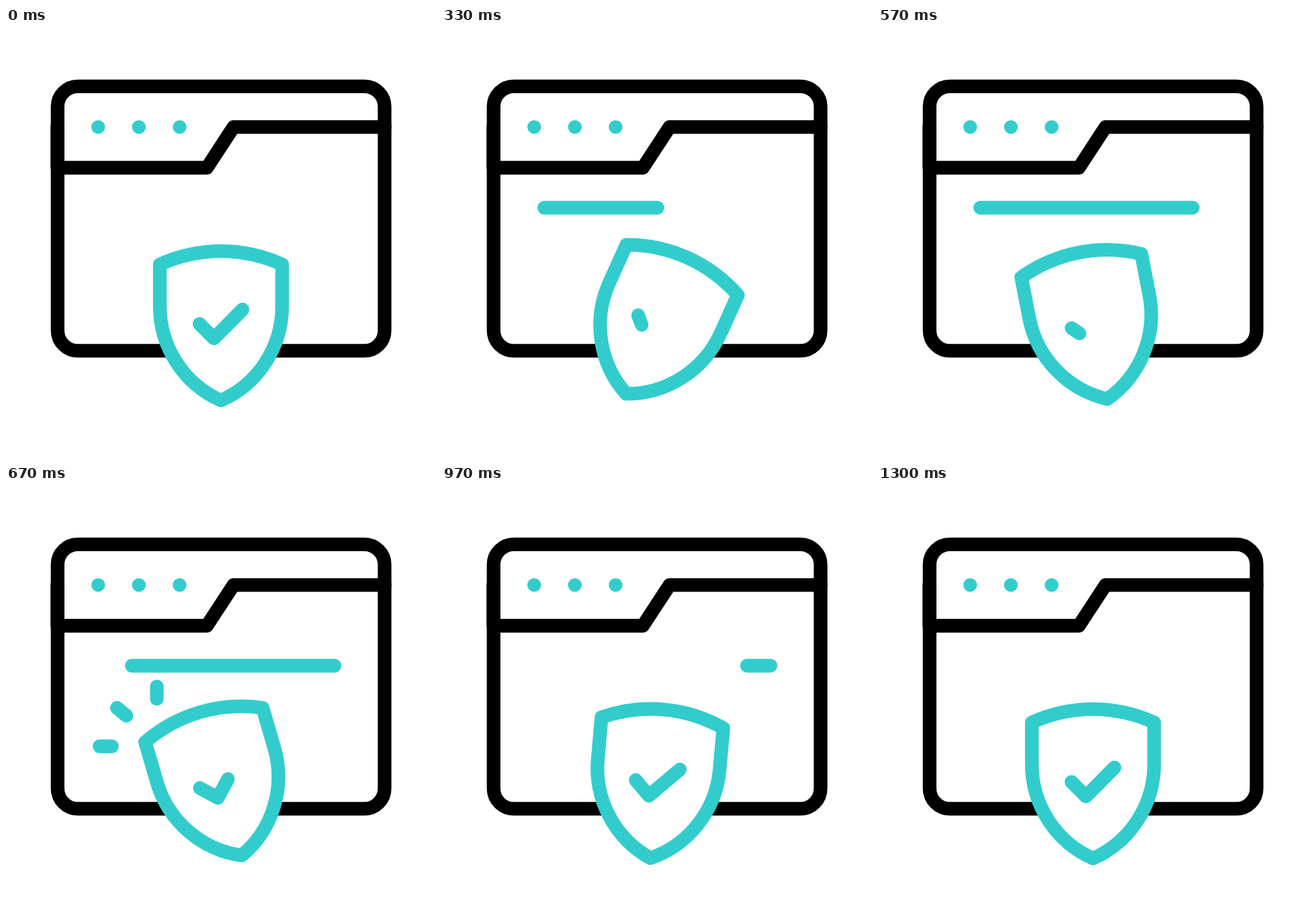
These frames come from a looping animation (640x640 px, 1.67 s). An HTML page with a canvas:

```html
<!DOCTYPE html>
<html lang="en">
<head>
<meta charset="utf-8">
<title>Protected folder</title>
<style>
  html, body { margin: 0; width: 100%; height: 100%; overflow: hidden; background: #fff; }
  canvas { display: block; width: 100vw; height: 100vh; }
</style>
</head>
<body>
<canvas id="stage" width="640" height="640"></canvas>
<script>
const ctx = document.getElementById('stage').getContext('2d');
const LOOP = 1670;
const TEAL = '#33cccc';
const PIVOT = [320, 443];

// Shield sway: [step, degrees]
const SWAY = [[1, 0], [11, 25], [19, -17.7], [26.2, 10], [33.4, -4.7], [39, 0]];

const CHECK = [[288, 440.5], [309.5, 462], [352, 419]];
const LINE = [[152.2, 267.5], [489, 267.5]];
const RAYS = [
  [[159.4, 387.5], [119, 387.5]],
  [[180.5, 343], [149.7, 317.3]],
  [[224.5, 318.6], [224.5, 278.2]]
];

function ease(step, from, to) {
  const x = Math.min(1, Math.max(0, (step - from) / (to - from)));
  return x * x * (3 - 2 * x);
}

function swayAngle(step) {
  let angle = 0;
  for (let i = 1; i < SWAY.length; i++) {
    const [a, va] = SWAY[i - 1], [b, vb] = SWAY[i];
    angle += (vb - va) * ease(step, a, b);
  }
  return angle * Math.PI / 180;
}

function strokePath(points) {
  ctx.beginPath();
  points.forEach(([x, y]) => ctx.lineTo(x, y));
  ctx.stroke();
}

// Strokes the part of a polyline between two fractions of its length.
function strokePart(points, from, to) {
  if (to - from < 0.001) return;
  const lengths = points.slice(1).map(([x, y], i) =>
    Math.hypot(x - points[i][0], y - points[i][1]));
  const total = lengths.reduce((a, b) => a + b);
  const part = [];
  let done = 0;
  lengths.forEach((len, i) => {
    const a = Math.max(0, (from * total - done) / len);
    const b = Math.min(1, (to * total - done) / len);
    const [p, q] = [points[i], points[i + 1]];
    const at = k => [p[0] + (q[0] - p[0]) * k, p[1] + (q[1] - p[1]) * k];
    if (a < b) part.push(at(a), at(b));
    done += len;
  });
  strokePath(part);
}

function drawFolder() {
  ctx.strokeStyle = '#000';
  ctx.beginPath();
  ctx.roundRect(76.8, 86.8, 486.7, 393.6, 30.2);
  ctx.stroke();
  strokePath([[563.7, 147.4], [338.7, 147.4], [299, 208], [76.5, 208], [76.5, 147.4]]);
  ctx.fillStyle = TEAL;
  for (let i = 0; i < 3; i++) {
    ctx.beginPath();
    ctx.arc(137.2 + i * 60.6, 147.4, 10.2, 0, Math.PI * 2);
    ctx.fill();
  }
}

function drawShield(step) {
  ctx.save();
  ctx.translate(...PIVOT);
  ctx.rotate(swayAngle(step));
  ctx.translate(-PIVOT[0], -PIVOT[1]);
  ctx.beginPath();
  ctx.moveTo(229, 352);
  ctx.bezierCurveTo(257.7, 339, 288.5, 332.2, 320, 332.2);
  ctx.bezierCurveTo(351.5, 332.2, 382.3, 339, 411, 352);
  ctx.lineTo(411, 414);
  ctx.bezierCurveTo(411, 475, 375, 530, 320, 554.3);
  ctx.bezierCurveTo(265, 530, 229, 475, 229, 414);
  ctx.closePath();
  ctx.fillStyle = '#fff';
  ctx.fill();
  ctx.stroke();
  strokePart(CHECK, 0, 1 - ease(step, 2.3, 12.7) + ease(step, 15, 23));
  ctx.restore();
}

function draw(step) {
  ctx.fillStyle = '#fff';
  ctx.fillRect(0, 0, 640, 640);
  ctx.lineWidth = 20.3;
  ctx.lineCap = ctx.lineJoin = 'round';
  drawFolder();
  ctx.strokeStyle = TEAL;
  strokePart(LINE, ease(step, 17, 32), ease(step, 0, 20));
  RAYS.forEach(ray => strokePart(ray, ease(step, 19, 27), ease(step, 17, 23)));
  drawShield(step);
}

// Three steps per 100 ms, held for 30, 40 and 30 ms.
function stepAt(ms) {
  const rest = ms % 100;
  return Math.floor(ms / 100) * 3 + (rest >= 30) + (rest >= 70);
}

const start = performance.now();
function tick() {
  draw(stepAt((performance.now() - start) % LOOP));
  requestAnimationFrame(tick);
}
tick();
</script>
</body>
</html>
```
